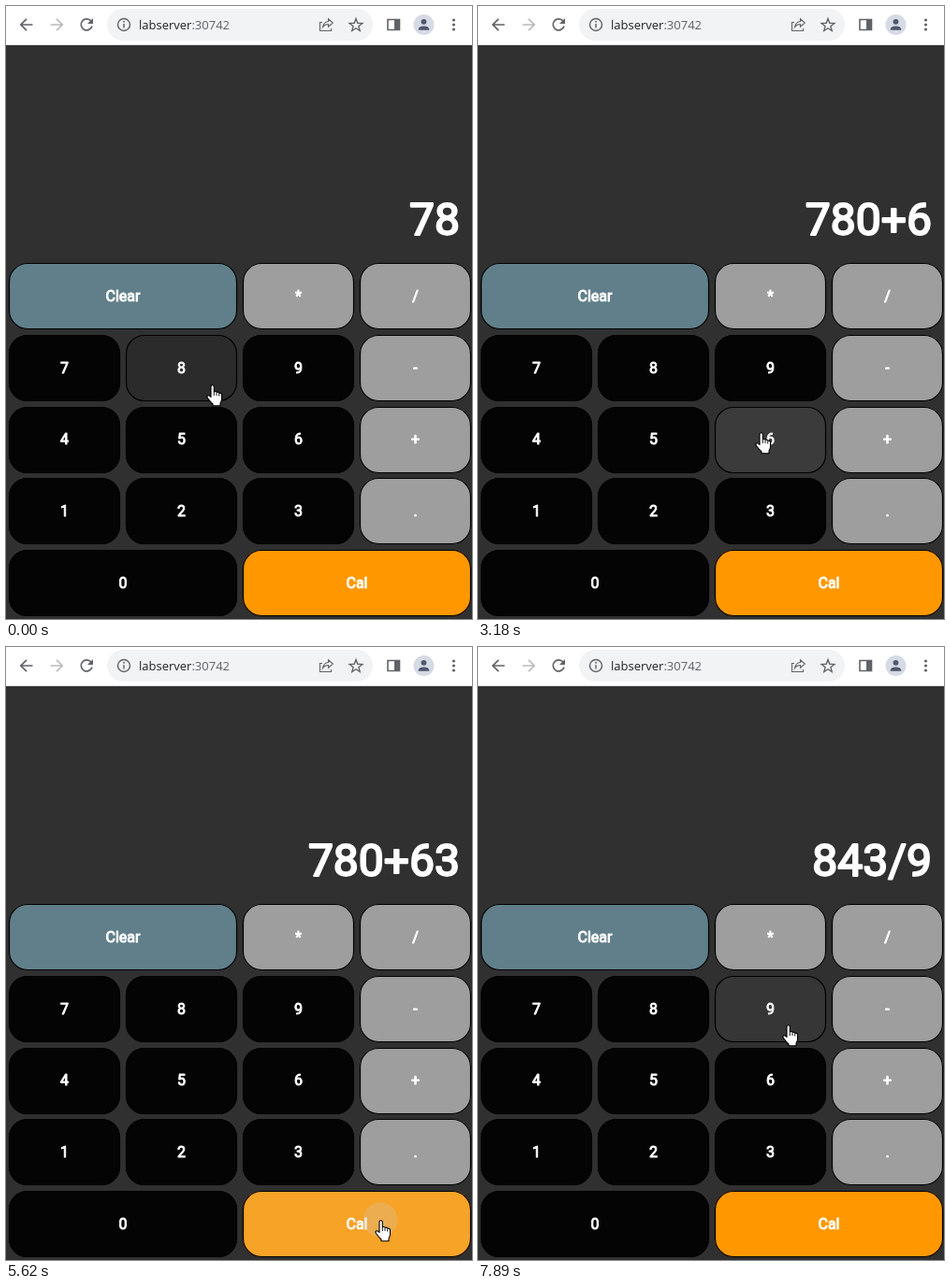
Animation, 498 px wide and 656 px high, one loop 8 s. Source, as an HTML page with a canvas:

```html
<!DOCTYPE html>
<html lang="en">
<head>
<meta charset="utf-8">
<title>Calculator</title>
<style>
html, body { margin: 0; width: 100%; height: 100%; overflow: hidden; background: #303030; }
canvas { display: block; }
</style>
</head>
<body>
<canvas id="stage" width="498" height="656"></canvas>
<script>
const ctx = document.getElementById('stage').getContext('2d');
const LOOP = 8000;
const FADE = 200;
const HOVER_LAG = 140;
const READOUT_LAG = 60;
const BLACK = '#040404', GREY = '#9e9e9e', BLUE = '#617f8a', ORANGE = '#ff9800';
const ICON = '#5f6368';

// The pointer visits one key after another; times are in ms.
const visits = [
  { key: '8', x: 220, y: 404, arrive: -600, down: -300, up: -125, leave: 0 },
  { key: '0', x: 180, y: 614, arrive: 560, down: 985, up: 1105, leave: 1100 },
  { key: '+', x: 446, y: 455, arrive: 1540, down: 1900, up: 2060, leave: 2420 },
  { key: '6', x: 302, y: 456, arrive: 2640, down: 2970, up: 3110, leave: 3265 },
  { key: '3', x: 314, y: 542, arrive: 3460, down: 3750, up: 3930, leave: 4300 },
  { key: 'Cal', x: 400, y: 613, arrive: 5240, down: 5500, up: 5640, leave: 5900 },
  { key: '/', x: 462, y: 309, arrive: 6350, down: 6740, up: 6900, leave: 7160 },
  { key: '9', x: 331, y: 404, arrive: 7360, down: 7580, up: 7780, leave: LOOP }
];

const rows = [['Clear', '', '*', '/'], ['7', '8', '9', '-'], ['4', '5', '6', '+'],
  ['1', '2', '3', '.'], ['0', '', 'Cal', '']];
const keys = [];
rows.forEach((row, r) => row.forEach((label, c) => {
  if (!label) return;
  const span = row[c + 1] === '' ? 2 : 1;
  const color = label === 'Clear' ? BLUE : label === 'Cal' ? ORANGE
    : /\d/.test(label) ? BLACK : GREY;
  const top = 275 + r * 76.75;
  keys.push({ label, color, x: c * 125 + 3, y: Math.round(top), w: span * 125 - 6, h: 71,
    baseline: Math.floor(top + 41.25) });
}));

const unit = v => Math.max(0, Math.min(1, v));
const easeOut = (u, power) => 1 - (1 - u) ** power;

// Sideways travel settles sooner than vertical travel, which bends the path.
function pointerAt(t) {
  let i = 0;
  while (i + 1 < visits.length && t >= visits[i].leave) i++;
  const to = visits[i], from = visits[Math.max(0, i - 1)];
  const u = unit((t - from.leave) / (to.arrive - from.leave));
  if (i === 0) return to;
  return {
    x: from.x + (to.x - from.x) * easeOut(u, 5.5),
    y: from.y + (to.y - from.y) * easeOut(u, 3)
  };
}

function readoutAt(t) {
  return visits.filter(v => t >= v.up + READOUT_LAG).reduce((text, { key }) =>
    key === 'Cal' ? String(text.split('+').reduce((sum, n) => sum + Number(n), 0)) : text + key, '7');
}

function disc(x, y, r, color) {
  ctx.beginPath();
  ctx.arc(x, y, r, 0, Math.PI * 2);
  ctx.fillStyle = color;
  ctx.fill();
}

function roundPath(x, y, w, h, r) {
  ctx.beginPath();
  ctx.roundRect(x, y, w, h, r);
}

function line(d, color = ICON, width = 1.7) {
  ctx.strokeStyle = color;
  ctx.lineWidth = width;
  ctx.stroke(new Path2D(d));
}

function heavyText(text, x, y, size, align, stroke) {
  ctx.font = `400 ${size}px Roboto, sans-serif`;
  ctx.textAlign = align;
  ctx.fillStyle = ctx.strokeStyle = '#fff';
  ctx.lineWidth = stroke;
  ctx.lineJoin = 'round';
  ctx.fillText(text, x, y);
  ctx.strokeText(text, x, y);
  ctx.lineJoin = 'miter';
}

function drawToolbar() {
  ctx.fillStyle = '#fff';
  ctx.fillRect(0, 0, 498, 41);
  ctx.fillStyle = '#dadce0';
  ctx.fillRect(0, 41, 498, 1);

  line('M28.5 20H16M22 13.8L15.8 20L22 26.2');
  line('M47.5 20H60M54 13.8L60.2 20L54 26.2', '#bababa');
  line('M91 16.2A6 6 0 1 0 92 21.5');
  ctx.fillStyle = ICON;
  ctx.fill(new Path2D('M93 13V19H87Z'));

  roundPath(108, 3, 284, 34, 17);
  ctx.fillStyle = '#f1f3f4';
  ctx.fill();
  line('M132.5 20A6.5 6.5 0 1 1 119.5 20A6.5 6.5 0 1 1 132.5 20M126 19V23.5', ICON, 1.4);
  disc(126, 16.8, 0.95, ICON);

  ctx.font = '13px "Open Sans", sans-serif';
  ctx.textAlign = 'left';
  ctx.fillStyle = '#202124';
  ctx.fillText('labserver', 142, 25);
  const hostWidth = ctx.measureText('labserver').width;
  ctx.fillStyle = ICON;
  ctx.fillText(':30742', 142 + hostWidth, 25);

  line('M338 17.5H335.5V26.5H347.5V24M338.5 22.5Q339.5 17 344.5 16.5V13.8L349.3 18L344.5 22.2V19.5Q340.5 19.5 338.5 22.5Z', ICON, 1.1);

  ctx.beginPath();
  for (let i = 0; i < 10; i++) {
    const a = -Math.PI / 2 + i * Math.PI / 5, r = i % 2 ? 3 : 7.2;
    ctx.lineTo(374 + r * Math.cos(a), 20.7 + r * Math.sin(a));
  }
  ctx.closePath();
  ctx.strokeStyle = ICON;
  ctx.lineWidth = 1.3;
  ctx.stroke();

  line('M408 14.5H420.5V25.5H408Z', ICON, 1.6);
  ctx.fillStyle = ICON;
  ctx.fillRect(415, 14, 5.5, 12);

  disc(446.5, 20, 11, '#d6dae4');
  disc(446.5, 16.8, 2.9, '#4f586b');
  ctx.fill(new Path2D('M440.8 25.8V24.4Q441.5 21.4 446.5 21.4Q451.5 21.4 452.2 24.4V25.8Z'));
  for (const dy of [-5, 0, 5]) disc(478.5, 20 + dy, 1.6, ICON);
}

function drawInk({ label, x, y, w, h }, t) {
  for (const v of visits) {
    if (v.key !== label || t < v.down || t > v.up + FADE) continue;
    const held = Math.min(t, v.up) - v.down;
    const released = Math.max(0, t - v.up);
    const glow = unit(unit(held / FADE) - released / FADE);
    ctx.fillStyle = `rgba(204,204,204,${0.25 * glow})`;
    ctx.fillRect(x, y, w, h);

    const reach = Math.hypot(Math.max(v.x - x, x + w - v.x), Math.max(v.y - y, y + h - v.y));
    const radius = Math.min(reach, reach * held / 1000 + released);
    disc(v.x, v.y, radius, `rgba(204,204,204,${0.25 * unit(1 - released / FADE)})`);
  }
}

function drawKey(key, t, hover) {
  const { x, y, w, h } = key;
  roundPath(x, y, w, h, 20);
  ctx.fillStyle = key.color;
  ctx.fill();
  heavyText(key.label, x + w / 2, key.baseline, 16, 'center', 0.95);

  ctx.save();
  roundPath(x, y, w, h, 20);
  ctx.clip();
  if (hover.x > x && hover.x < x + w && hover.y > y && hover.y < y + h) {
    ctx.fillStyle = 'rgba(255,255,255,0.04)';
    ctx.fillRect(x, y, w, h);
  }
  drawInk(key, t);
  ctx.restore();

  roundPath(x + 0.5, y + 0.5, w - 1, h - 1, 19.5);
  ctx.strokeStyle = '#000';
  ctx.lineWidth = 1.2;
  ctx.stroke();
}

const hand = new Path2D('M5 13V2.5Q5 .7 6.6 .7Q8.3 .7 8.3 2.5V7.8Q10 6.9 11 8.3Q12.7 7.6 13.7 9.2Q16.4 8.8 16.5 11.2V16Q16.2 18.3 15 20V22.7H7V21Q4 18 1.4 14.5Q.3 12.4 1.8 11.8Q3.4 11.5 5 13.5Z');

function drawPointer({ x, y }) {
  ctx.save();
  ctx.translate(Math.round(x) - 6, Math.round(y));
  ctx.fillStyle = '#fff';
  ctx.fill(hand);
  ctx.lineJoin = 'round';
  ctx.strokeStyle = '#000';
  ctx.lineWidth = 1.1;
  ctx.stroke(hand);
  line('M8.3 8V12M11 8.8V12M13.7 9.8V12.5', '#000', 0.9);
  ctx.restore();
}

function draw(t) {
  ctx.fillStyle = '#303030';
  ctx.fillRect(0, 0, 498, 656);
  drawToolbar();
  heavyText(readoutAt(t), 485, 245, 48, 'right', 2.1);
  const hover = pointerAt(t - HOVER_LAG);
  for (const key of keys) drawKey(key, t, hover);
  drawPointer(pointerAt(t));
}

const start = performance.now();
function tick() {
  draw((performance.now() - start) % LOOP);
  requestAnimationFrame(tick);
}
tick();
</script>
</body>
</html>
```
